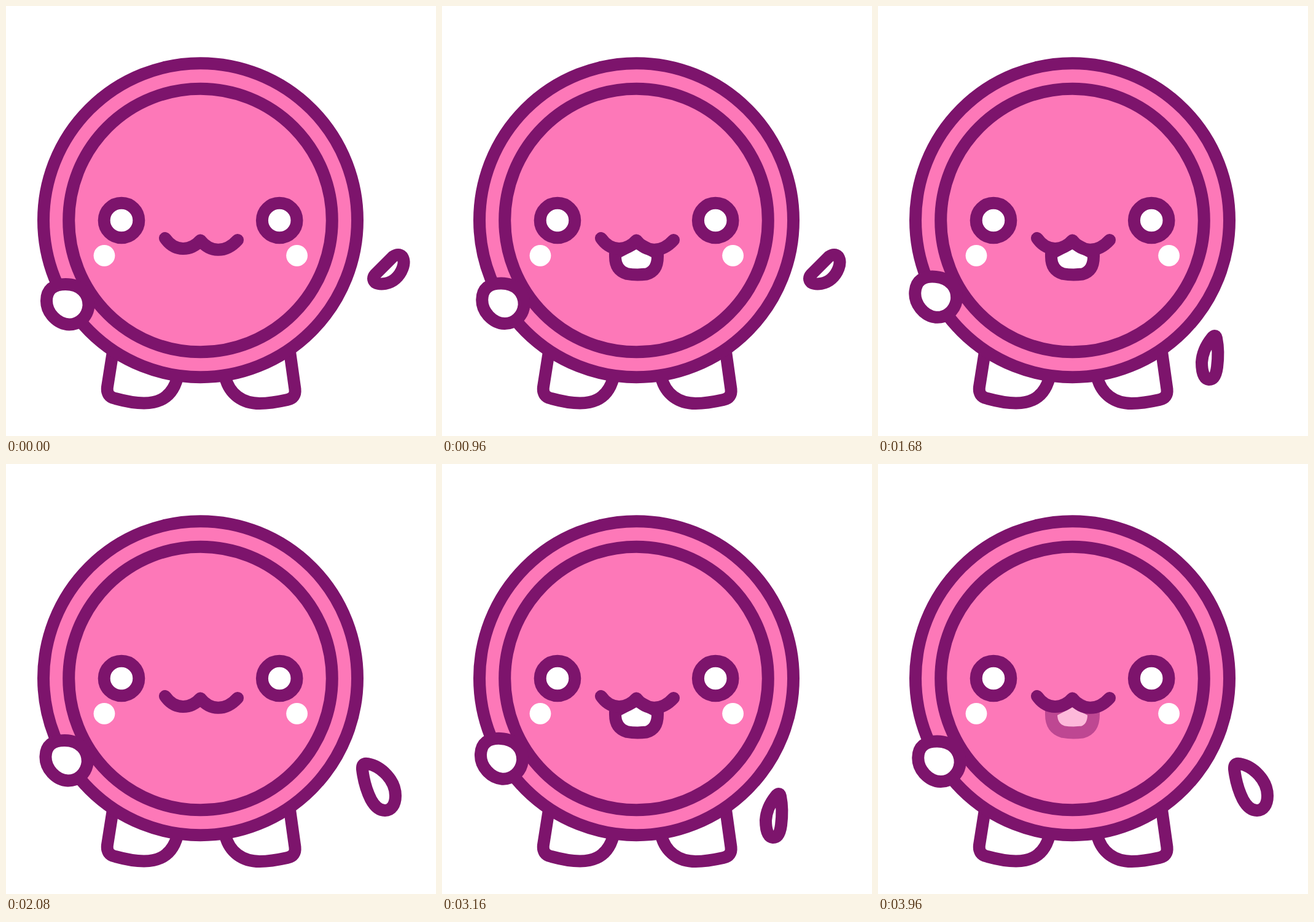
Animation of 700 by 700 pixels, one loop 4 s. Source, as an HTML page:

```html
<!DOCTYPE html>
<html lang="en">
<head>
<meta charset="utf-8">
<title>Waving button</title>
<style>
  html, body { margin: 0; width: 100%; height: 100%; overflow: hidden; background: #fff; }
  svg { display: block; width: 100vw; height: 100vh; }
  .line { fill: #fff; stroke: #7d146c; stroke-width: 20; stroke-linecap: round; stroke-linejoin: round; }
  .pink { fill: #fd78b8; }
  .bare { fill: none; }
  .cheek { fill: #fff; }
</style>
</head>
<body>
<svg viewBox="0 0 700 700">
  <g class="line">
    <path d="M174 563 L165 620 Q163 636 178 639 C200 645 222 649 240 645 C260 641 273 628 279 605"/>
    <path d="M462 563 L470.5 624 Q472 638 458 641 C440 645 425 647 413 647 C385 647 364 632 357 605"/>
    <circle class="pink" cx="316.5" cy="348.7" r="255.5"/>
    <circle class="pink" cx="316.5" cy="349" r="214.3"/>
  </g>

  <g id="eyesOpen" class="line">
    <circle cx="188" cy="349" r="28.3"/>
    <circle cx="445.2" cy="349" r="28.3"/>
  </g>
  <path id="eyesShut" class="line" d="M143.5 349.3 H232.5 M401 349.3 H490"/>

  <g class="cheek">
    <circle cx="160" cy="406.3" r="17.4"/>
    <circle cx="473.6" cy="406.3" r="17.4"/>
  </g>

  <g id="mouth">
    <path class="line" d="M282 403 V408 Q282 430 301 436 Q316 438.500 333 436.500 Q351 431 351 408 V403 L316.500 385 Z"/>
  </g>
  <path class="line bare" d="M259 378 C275 401 301 399 316.500 381.500 C332 401 357 403 377 381"/>

  <path id="hand" class="line" d="M97 453 C121 453 135 468 134.500 488 C133 506 119 518.500 103 518.500 C84 518 66 500 66 480 C66 462 77 453 97 453 Z"/>

  <g class="line">
    <path id="tailUp" d="M630 408 Q639 402 645 408 C652 419 643 436 634 444 C625 452 610 455 601 450 Q595 444 601 437 Z"/>
    <path id="tailMid" d="M580 497 Q579 486 589 488 C611 492 634 515 634 540 C634 555 627 564 617 564 C607 564 600 557 594 546 C587 532 582 514 580 497 Z"/>
    <path id="tailDown" d="M543 541 Q549 533 551 541 C554 556 554 572 552 588 C550 603 546 608 539 608 C530 607 527 594 527 580 C528 565 535 551 543 541 Z"/>
  </g>
</svg>
<script>
  const LOOP = 4000;
  const SHOULDER = '216 417';
  const SWING = 9;
  const BLINKS = [1080, 2200, 3360];
  const BLINK_LENGTH = 240;
  const part = id => document.getElementById(id);
  const show = (id, on) => part(id).setAttribute('visibility', on ? 'visible' : 'hidden');
  const clamp = x => Math.max(0, Math.min(1, x));
  const start = performance.now();

  function tailPose(t) {
    const phase = t % 480;
    if (phase < 80) return 'tailUp';
    return phase >= 240 && phase < 320 ? 'tailDown' : 'tailMid';
  }

  function draw(t) {
    const swing = 1 - Math.abs(1 - (t % 1000) / 500);
    part('hand').setAttribute('transform', `rotate(${SWING * swing} ${SHOULDER})`);

    const speech = t % 2000;
    const open = Math.min(clamp((speech - 400) / 80), clamp((2000 - speech) / 80));
    part('mouth').setAttribute('opacity', open);

    // The small lead keeps hard switches clear of timer jitter.
    const step = t + 8;
    const shut = BLINKS.some(b => step >= b && step < b + BLINK_LENGTH);
    show('eyesShut', shut);
    show('eyesOpen', !shut);

    const pose = tailPose(step % LOOP);
    for (const id of ['tailUp', 'tailMid', 'tailDown']) show(id, id === pose);
  }

  function tick() {
    draw((performance.now() - start) % LOOP);
    requestAnimationFrame(tick);
  }
  tick();
</script>
</body>
</html>
```
